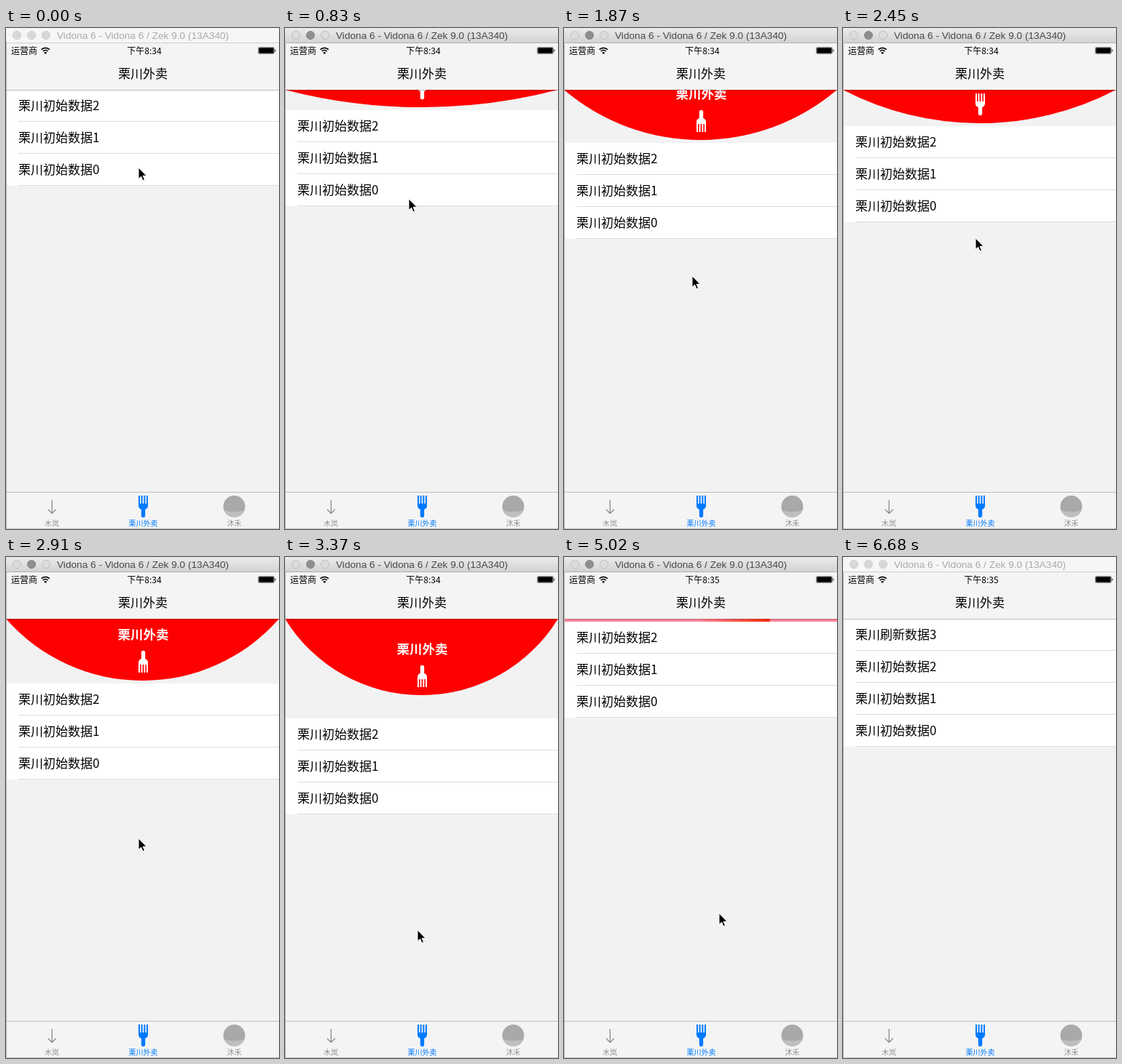
Recreate the animation shown at these times as an HTML page. Size 375 px wide and 689 px high, loop 6730 ms.

```html
<!DOCTYPE html>
<html lang="zh">
<head>
<meta charset="utf-8">
<title>下拉刷新</title>
<style>
  html, body { margin: 0; width: 100%; height: 100%; overflow: hidden; background: #f2f2f2; }
  svg { display: block; width: 375px; height: 689px; }
  text { font-family: "Noto Sans CJK SC", "Noto Sans CJK", sans-serif; white-space: pre; }
  .mid { text-anchor: middle; }
  .row { font-size: 17px; }
  .tab { font-size: 10px; fill: #929292; text-anchor: middle; }
  #caption { font: 13.65px "Liberation Sans", Arial, sans-serif; }
</style>
</head>
<body>
<svg viewBox="0 0 375 689" xmlns="http://www.w3.org/2000/svg">
  <defs>
    <linearGradient id="chrome" x2="0" y2="1">
      <stop stop-color="#ebebeb"/><stop offset="1" stop-color="#d3d3d3"/>
    </linearGradient>
    <linearGradient id="glow">
      <stop stop-color="#ff869c"/><stop offset="1" stop-color="#ff2a08"/>
    </linearGradient>
    <g id="fork">
      <path d="M-5.5-15V-3M-1.9-15V-3M1.9-15V-3M5.5-15V-3" stroke="currentColor" stroke-width="2"/>
      <path d="M-6.5-4H6.5V-1Q6.5 2.6 2.7 4V12.5A2.7 2.7 0 0 1-2.7 12.5V4Q-6.5 2.6-6.5-1Z" fill="currentColor"/>
    </g>
  </defs>

  <rect width="375" height="689" fill="#f2f2f2"/>

  <!-- pull-down curtain -->
  <path id="curtain" fill="#f00"/>
  <g id="badge" color="#fff">
    <text class="mid" y="-31" font-size="17.5" font-weight="900" fill="#fff">栗川外卖</text>
    <use id="spin" href="#fork"/>
  </g>

  <g id="list"></g>
  <g id="bar">
    <rect y="-4" width="375" height="4" fill="#ff869c"/>
    <rect id="head" y="-4" width="100" height="4" fill="url(#glow)"/>
  </g>

  <!-- status and navigation bar -->
  <rect y="21" width="375" height="64" fill="#f4f4f4"/>
  <rect y="85" width="375" height="1" fill="#000" opacity=".25"/>
  <text x="7" y="35.5" font-size="12">运营商</text>
  <g fill="none" stroke="#000" stroke-width="1.7">
    <path d="M48.6 29.6a8 8 0 0 1 11.2 0M50.7 32a5 5 0 0 1 7 0"/>
  </g>
  <path d="M54.2 36l-2-2.1a3 3 0 0 1 4 0Z"/>
  <text id="clock" class="mid" x="190" y="35.5" font-size="12" font-weight="500"></text>
  <rect x="346.5" y="26.5" width="22" height="9" rx="1.5" fill="none" stroke="#777" stroke-width=".8"/>
  <rect x="347.3" y="27.3" width="20.4" height="7.4" rx="1"/>
  <path d="M369.5 29.3a2 2 0 0 1 0 3.6Z"/>
  <text class="mid" x="188" y="69" font-size="17" font-weight="500">栗川外卖</text>

  <!-- tab bar -->
  <rect y="638" width="375" height="51" fill="#f4f4f4"/>
  <rect y="638" width="375" height="1" fill="#bdbdbd"/>
  <path d="M63.3 649V667.3M57.8 662L63.3 667.5L68.8 662" fill="none" stroke="#8c8c8c" stroke-width="1.3"/>
  <use href="#fork" x="188.5" y="658" color="#007aff"/>
  <circle cx="313.5" cy="658" r="15" fill="#a9a9a9"/>
  <path d="M299.6 663.5Q313.5 667.5 327.4 663.5A15 15 0 0 1 299.6 663.5Z" fill="#bfbfbf"/>
  <text class="tab" x="63" y="684.7">木岚</text>
  <text class="tab" x="188.5" y="684.7" style="fill:#007aff">栗川外卖</text>
  <text class="tab" x="313.5" y="684.7">沐禾</text>

  <!-- window chrome -->
  <rect id="title" width="375" height="20"/>
  <rect id="edge" y="20" width="375" height="1"/>
  <g id="lights" stroke-width=".8"></g>
  <text id="caption" x="70" y="15">Vidona 6 - Vidona 6 / Zek 9.0 (13A340)</text>
  <rect y="20" width="1" height="669" fill="#b4b4b4"/>
  <rect y="688" width="375" height="1" fill="#c4c4c4"/>

  <path id="cursor" d="M0 0V15.5L3.6 12.2L6 17.8L8.5 16.7L6.1 11.3H11Z" stroke="#fff" stroke-width="1"/>
</svg>

<script>
const LOOP = 6730, STEP = 116.5, LAST = 57;
const $ = id => document.getElementById(id);
const set = (id, attrs) => {
  for (const name in attrs) $(id).setAttribute(name, attrs[name]);
};

// Tables of [step, value...]; a step is one screen refresh.
const POINTER = [
  [0, 182, 192], [1, 174, 180], [2, 168, 172], [3, 170, 184], [4, 170, 184],
  [5, 170, 188], [11, 171, 330], [13, 173, 352], [16, 176, 341], [21, 182, 289],
  [22, 182, 292], [28, 182, 481], [29, 182, 513], [30, 181, 532], [31, 181, 535],
  [35, 181, 535], [40, 210, 489], [43, 213, 490], [46, 214, 489],
  [52, 271, 644], [55, 312, 692], [LAST, 312, 692]
];
const PULL = [
  [0, 0], [5, 0], [8, 42], [10, 62], [11, 70], [13, 78], [16, 73], [21, 50], [22, 52],
  [28, 126], [29, 137], [30, 142], [31, 104], [32, 52], [33, 20], [34, 6], [35, 4],
  [47, 4], [49, 0], [LAST, 0]
];
const TURN = [
  [0, 0], [9, 0], [11, 135], [12, 180], [18, 180], [20, 0], [23, 0], [25, 180], [LAST, 180]
];

function at(table, k) {
  let i = 1;
  while (i < table.length - 1 && table[i][0] < k) i++;
  const a = table[i - 1], b = table[i];
  const p = (k - a[0]) / (b[0] - a[0]);
  return a.slice(1).map((v, j) => v + (b[j + 1] - v) * p);
}

function rows(count) {
  const labels = ["栗川刷新数据3", "栗川初始数据2", "栗川初始数据1", "栗川初始数据0"].slice(-count);
  return `<rect width="375" height="${count * 44}" fill="#fff"/>` + labels.map((label, i) =>
    `<text class="row" x="17" y="${i * 44 + 28}">${label}</text>` +
    `<rect x="17" y="${i * 44 + 43}" width="358" height="1" fill="#dcdcdc"/>`).join("");
}

function lights(active) {
  return [15, 35, 55].map((x, i) => {
    const dark = active && i === 1;
    const fill = dark ? "#8e8e8e" : active ? "#dcdcdc" : "#d8d8d8";
    const line = dark ? "#808080" : active ? "#b9b9b9" : "#cacaca";
    return `<circle cx="${x}" cy="10" r="5.6" fill="${fill}" stroke="${line}"/>`;
  }).join("");
}

function curtain(depth) {
  if (depth <= 0) return "";
  const r = (187.5 ** 2 + depth ** 2) / (2 * depth);
  return `M0 85A${r} ${r} 0 0 0 375 85Z`;
}

function draw(k) {
  const [x, y] = at(POINTER, k).map(Math.round);
  const pull = Math.round(at(PULL, k)[0]);
  const depth = Math.max(0, Math.min(pull - 4, 105));
  const active = k >= 5 && k < LAST;
  const top = `translate(0 ${85 + pull})`;

  set("cursor", { transform: `translate(${x} ${y})`, visibility: k < LAST ? "visible" : "hidden" });
  set("curtain", { d: curtain(depth) });
  set("badge", {
    transform: `translate(188.5 ${59 + depth})`,
    visibility: depth > 0 ? "visible" : "hidden"
  });
  set("spin", { transform: `rotate(${at(TURN, k)[0]})` });

  $("list").innerHTML = rows(k < 48 ? 3 : 4);
  set("list", { transform: top });
  set("bar", { transform: top, visibility: k >= 31 && k < 48 ? "visible" : "hidden" });
  set("head", { x: 74 + 23.2 * (k - 34) - 100 });

  $("clock").textContent = k < 32 ? "下午8:34" : "下午8:35";
  $("lights").innerHTML = lights(active);
  set("title", { fill: active ? "url(#chrome)" : "#f6f6f6" });
  set("edge", { fill: active ? "#b1b1b1" : "#d0d0d0" });
  set("caption", { fill: active ? "#484848" : "#a9a9a9" });
}

let shown = -1;
function tick() {
  const t = performance.now() % LOOP;
  const k = t < LOOP - 50 ? Math.min(LAST - 1, Math.floor((t + 10) / STEP)) : LAST;
  if (k !== shown) draw(shown = k);
  requestAnimationFrame(tick);
}
tick();
</script>
</body>
</html>
```
